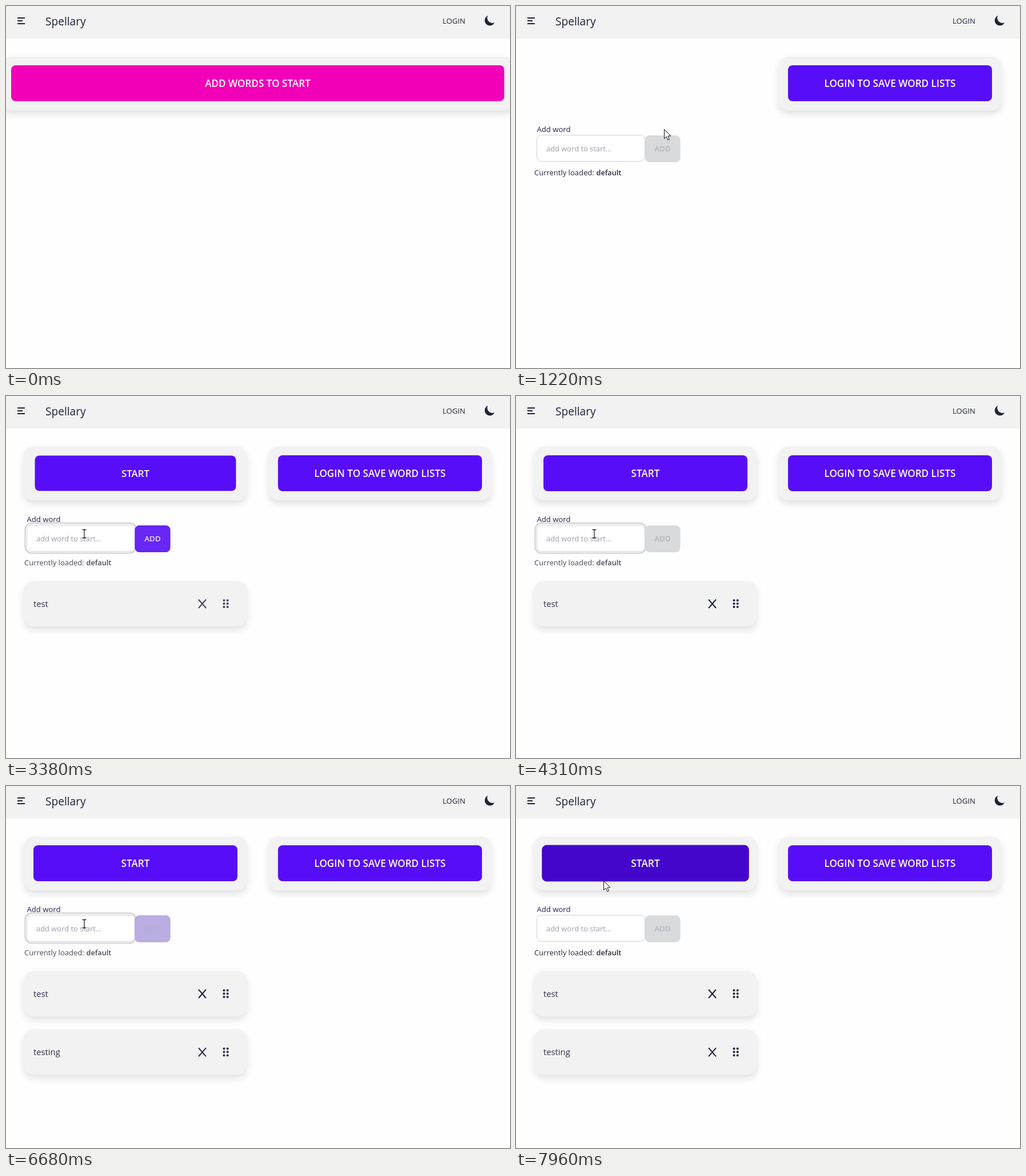
An HTML page with a canvas for the animation above (7990 ms loop, 882 px wide and 635 px high).

```html
<!DOCTYPE html>
<html lang="en">
<head>
<meta charset="utf-8">
<title>Word list</title>
<style>
  html, body { margin: 0; width: 100%; height: 100%; overflow: hidden; background: #fefefe; }
  canvas { display: block; }
</style>
</head>
<body>
<canvas id="stage" width="882" height="635"></canvas>
<script>
const ctx = document.getElementById('stage').getContext('2d');
const LOOP = 7990;
const INK = '#1f2338', PAGE = '#fefefe', PANEL = '#f2f2f2';
const PINK = [242, 0, 184], PINK_DARK = [192, 0, 148];
const VIOLET = [87, 13, 248], VIOLET_DARK = [68, 6, 203];
const DISABLED = [216, 218, 220];

// Moments of the story, in ms
const OPEN_PAGE = 938, FOCUS = 1520, BLUR = 7730;
const ENTER_1 = 3372, ENTER_2 = 6602;
const WORDS = [
  { text: 'test', keys: [2350, 2480, 2620, 2750], enter: ENTER_1 },
  { text: 'testing', keys: [4610, 4780, 5110, 5280, 5780, 5920, 6050], enter: ENTER_2 },
];
const CARET_ON = [[FOCUS, 2020], [2350, 3280], [3810, 4310], [4610, 6580], [7120, BLUR]];
const CLICKS = [[810, OPEN_PAGE], [1490, 1610], [BLUR, 7900]];
// start, end, then start point, control point and end point
const MOVES = [
  [170, 760, 345, 616, 325, 380, 320, 148],
  [940, 1480, 320, 148, 300, 232, 137, 242],
  [7345, 7690, 137, 242, 140, 190, 158, 150],
  [7880, 7980, 158, 150, 156, 158, 152, 168],
];

const clamp = v => Math.min(1, Math.max(0, v));
const easeOut = (v, power = 3) => 1 - (1 - clamp(v)) ** power;
const smooth = v => { v = clamp(v); return v * v * (3 - 2 * v); };
const ramp = (t, start) => easeOut((t - start) / 200);
const within = (t, spans) => spans.some(([a, b]) => t >= a && t < b);
const mix = (a, b, k) => `rgb(${a.map((v, i) => Math.round(v + (b[i] - v) * k))})`;

function pop(t, start) {
  const u = (t - start) / 250;
  if (u < 0 || u >= 1) return 1;
  return u < 0.4 ? 0.98 + 0.04 * easeOut(u / 0.4, 1.7)
                 : 1.02 - 0.02 * easeOut((u - 0.4) / 0.6, 1.7);
}

function pressed(t, down, up) {
  return t < up ? 1 - 0.03 * ramp(t, down) : pop(t, up);
}

function label(text, x, y, size, color = INK, weight = 400, align = 'left') {
  ctx.font = `${weight} ${size}px "Open Sans", sans-serif`;
  ctx.textAlign = align;
  ctx.fillStyle = color;
  ctx.fillText(text, x, y);
  return ctx.measureText(text).width;
}

function box(x, y, w, h, r, fill, stroke, lineWidth = 1) {
  ctx.beginPath();
  ctx.roundRect(x, y, w, h, r);
  if (fill) { ctx.fillStyle = fill; ctx.fill(); }
  if (stroke) { ctx.strokeStyle = stroke; ctx.lineWidth = lineWidth; ctx.stroke(); }
}

function line(width, color, ...points) {
  ctx.lineWidth = width;
  ctx.strokeStyle = color;
  ctx.beginPath();
  for (const [x1, y1, x2, y2] of points) { ctx.moveTo(x1, y1); ctx.lineTo(x2, y2); }
  ctx.stroke();
}

function card(x, y, w, h) {
  ctx.save();
  ctx.shadowColor = 'rgba(0,0,0,.12)';
  ctx.shadowBlur = 13;
  ctx.shadowOffsetY = 6;
  box(x, y, w, h, 16, PANEL);
  ctx.restore();
}

function scaled(cx, cy, scale, draw) {
  ctx.save();
  ctx.translate(cx, cy);
  ctx.scale(scale, scale);
  draw();
  ctx.restore();
}

function bigButton(cardX, cardW, text, color, scale) {
  card(cardX, 89, cardW, 94);
  const w = cardW - 32;
  scaled(cardX + cardW / 2, 135.5, scale, () => {
    box(-w / 2, -31.5, w, 63, 8, color);
    label(text, 0, 6.5, 17.1, '#fff', 600, 'center');
  });
}

const moon = new Path2D('M17.293 13.293A8 8 0 016.707 2.707a8.001 8.001 0 1010.586 10.586z');

function header() {
  ctx.fillStyle = PANEL;
  ctx.fillRect(0, 0, 882, 57);
  line(2, INK, [20, 21, 33, 21], [20, 26, 29, 26], [20, 31, 33, 31]);
  label('Spellary', 69, 33.5, 19.1, INK, 500);
  label('LOGIN', 764, 30.5, 13.1);
  ctx.save();
  ctx.translate(835.5, 14);
  ctx.scale(1.13, 1.13);
  ctx.fillStyle = INK;
  ctx.fill(moon);
  ctx.restore();
}

function wordCard(text, y, shown) {
  card(32, y, 389, 79);
  label(text, 48, y + 45, 14.8, '#33304a');
  ctx.globalAlpha = 0.8 + 0.2 * shown;
  line(2, INK, [337, y + 32, 350, y + 47], [350, y + 32, 337, y + 47]);
  ctx.fillStyle = INK;
  for (let i = 0; i < 6; i++) {
    ctx.beginPath();
    ctx.arc(381.5 + (i % 2) * 6.2, y + 33.5 + (i >> 1) * 5.8, 2, 0, 7);
    ctx.fill();
  }
  ctx.globalAlpha = 1;
}

function addButton(t) {
  const on = ramp(t, 2354) - ramp(t, ENTER_1) + ramp(t, 4610) - ramp(t, ENTER_2);
  scaled(256.5, 250.5, pop(t, OPEN_PAGE), () => {
    box(-31, -23.5, 62, 47, 8, mix(DISABLED, VIOLET, on));
    box(-30.5, -23, 61, 46, 7.5, null, `rgba(${VIOLET},${on * 0.5})`);
    label('ADD', 0, 4.7, 13.4, `rgba(31,41,55,${0.2 * (1 - on)})`, 600, 'center');
    label('ADD', 0, 4.7, 13.4, `rgba(255,255,255,${on})`, 600, 'center');
  });
}

function typedText(t) {
  const word = WORDS.find(w => t >= w.keys[0] && t < w.enter);
  return word ? word.text.slice(0, word.keys.filter(k => t >= k).length) : '';
}

function wordForm(t) {
  const focused = t >= FOCUS && t < BLUR;
  label('Add word', 36.5, 220.5, 13.1, '#24214c');
  if (focused) box(33.5, 223, 194, 52.5, 11, null, '#cdcdd5', 2);
  box(36.5, 226.5, 189, 46, 8, '#fff', '#d0d1d6');
  addButton(t);

  const typed = typedText(t);
  const width = typed ? label(typed, 53, 255, 13.1, '#2f2c40') : 0;
  if (!typed) label('add word to start...', 53, 255, 12.9, '#a09aa8');
  if (within(t, CARET_ON)) {
    ctx.fillStyle = '#111';
    ctx.fillRect(Math.round(53 + width), 240, 1, 19);
  }

  const color = focused ? '#4a4a58' : '#29293a';
  label('Currently loaded:', 32, 296.5, 13, color);
  label('default', 140.5, 296.5, 12.7, color, 600);
}

function arrow() {
  const points = [[0, 0], [0, 16], [3.7, 12.6], [6.3, 18.6], [8.9, 17.5], [6.3, 11.6], [11.4, 11.4]];
  ctx.beginPath();
  points.forEach(([x, y]) => ctx.lineTo(x + 0.5, y + 0.5));
  ctx.closePath();
  ctx.fillStyle = '#fff';
  ctx.fill();
  ctx.lineWidth = 1;
  ctx.strokeStyle = '#111';
  ctx.stroke();
}

function cursorAt(t) {
  const move = MOVES.filter(m => t >= m[0]).pop();
  if (!move) return null;
  const [start, end, x0, y0, cx, cy, x1, y1] = move;
  const k = smooth((t - start) / (end - start)), j = 1 - k;
  return [j * j * x0 + 2 * j * k * cx + k * k * x1, j * j * y0 + 2 * j * k * cy + k * k * y1];
}

function cursor(t) {
  const at = cursorAt(t);
  if (!at) return;
  const [x, y] = at;
  ctx.save();
  ctx.translate(Math.round(x), Math.round(y));
  if (within(t, CLICKS)) {
    ctx.beginPath();
    ctx.arc(0, 0, 12, 0, 7);
    ctx.fillStyle = 'rgba(235,150,64,.85)';
    ctx.fill();
  }
  const overInput = t >= OPEN_PAGE && x > 36 && x < 226 && y > 226 && y < 273;
  if (overInput) line(1.3, '#222', [0, -7, 0, 7], [-3.5, -7.5, 3.5, -7.5], [-3.5, 7, 3.5, 7]);
  else arrow();
  ctx.restore();
}

function draw(t) {
  ctx.fillStyle = PAGE;
  ctx.fillRect(0, 0, 882, 635);
  header();
  if (t < OPEN_PAGE) {
    bigButton(-7, 895, 'ADD WORDS TO START', mix(PINK, PINK_DARK, ramp(t, 640)), pressed(t, 810, 900));
  } else {
    bigButton(460, 389, 'LOGIN TO SAVE WORD LISTS', mix(VIOLET, VIOLET, 0), pop(t, OPEN_PAGE));
    if (t >= ENTER_1) {
      const scale = t < BLUR ? pop(t, ENTER_1) : pressed(t, BLUR, 7890);
      bigButton(32, 389, 'START', mix(VIOLET, VIOLET_DARK, ramp(t, 7600)), scale);
    }
    wordForm(t);
    WORDS.forEach((word, i) => {
      if (t >= word.enter) wordCard(word.text, 325 + i * 102.3, ramp(t, word.enter));
    });
  }
  cursor(t);
}

const begin = performance.now();
function tick() {
  draw((performance.now() - begin) % LOOP);
  requestAnimationFrame(tick);
}
tick();
</script>
</body>
</html>
```
